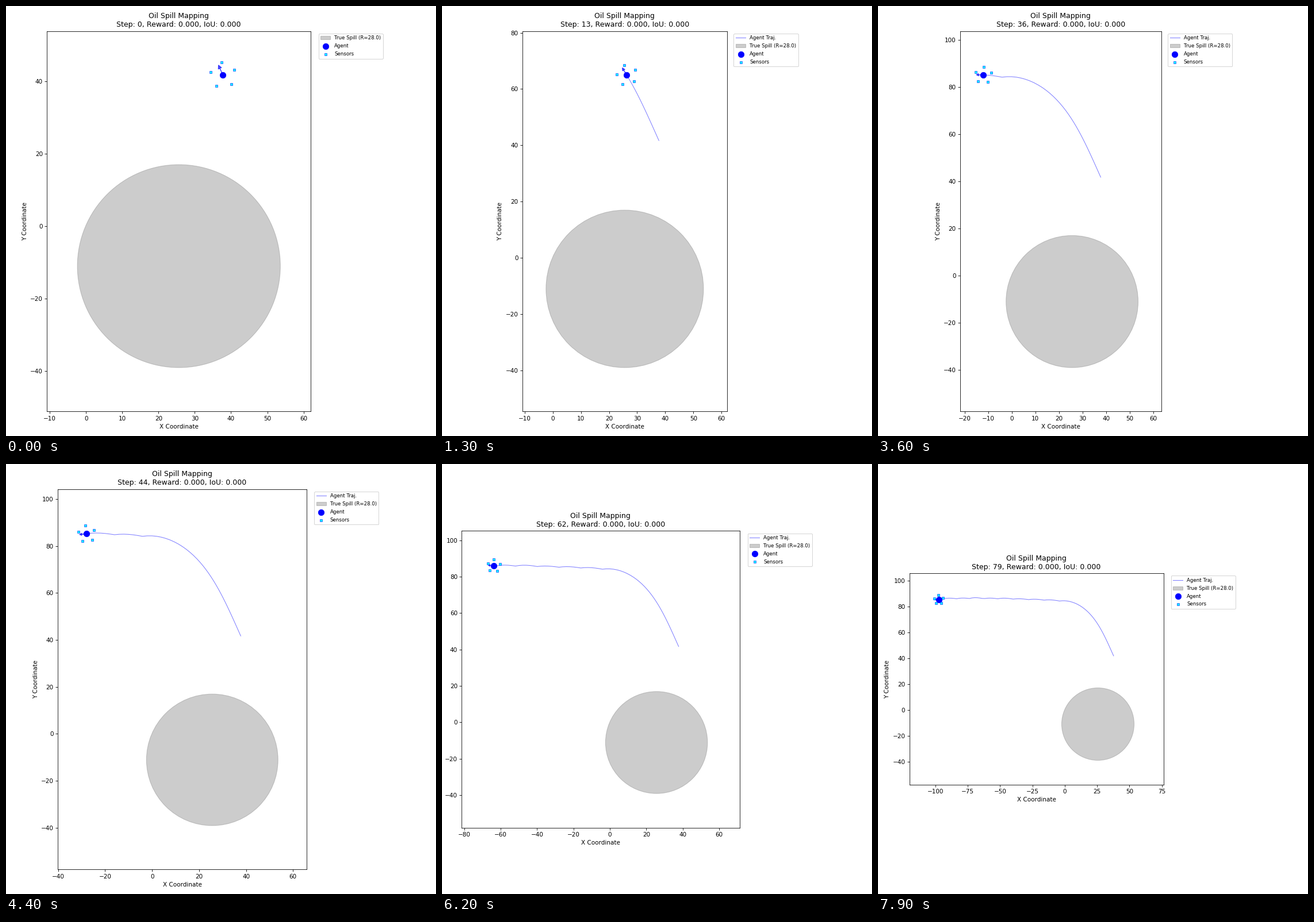
Animation of 748x748 px, one loop 8 s. Source, as a matplotlib script:

```python
import matplotlib.pyplot as plt
import numpy as np
from matplotlib.animation import FuncAnimation

STEPS = 80
SPEED = 2.0
START = (37.74, 41.66)
CENTER = np.array([25.6, -11.07])
RADIUS = 28.0
SENSOR_RANGE = 3.5
MARGIN = 0.15

# Steering cycles: (last step, heading after the correction, heading before the next)
CYCLES = [(38, 170, 185.5), (44, 171.5, 186.5), (50, 172.5, 185.5),
          (56, 171, 189), (61, 172.5, 187), (62, 178, 178),
          (67, 170.5, 193), (72, 174, 190), (78, 173, 195), (79, 182, 182)]


def build_headings():
    """Heading in degrees per step: a tightening turn, then a sawtooth drift."""
    turn = 114 + 41.8 * (np.arange(33) / 26) ** 2.6
    parts, last = [turn], 32
    for end, low, high in CYCLES:
        u = np.linspace(0, 1, end - last)
        parts.append(low + (high - low) * u ** 1.4)
        last = end
    return np.radians(np.concatenate(parts))


heading = build_headings()
moves = SPEED * np.column_stack([np.cos(heading), np.sin(heading)])
moves[0] = START
path = np.cumsum(moves, axis=0)

fig = plt.figure(figsize=(10, 10), dpi=74.8)
ax = fig.add_subplot()


def set_limits(trail):
    low = np.minimum(trail.min(axis=0), CENTER - RADIUS)
    high = np.maximum(trail.max(axis=0), CENTER + RADIUS)
    pad = MARGIN * (high - low)
    ax.set_xlim(low[0] - pad[0], high[0] + pad[0])
    ax.set_ylim(low[1] - pad[1], high[1] + pad[1])
    ax.set_aspect("equal", adjustable="box")


def draw_agent(pos, angle):
    ax.scatter(*pos, s=100, c="blue", linewidths=0.75, zorder=5, label="Agent")
    ax.arrow(*pos, 2 * np.cos(angle), 2 * np.sin(angle), head_width=1,
             head_length=1, fc="blue", ec="blue", alpha=0.7, zorder=4)
    spread = angle - np.pi / 2 + np.arange(5) * 2 * np.pi / 5
    ax.scatter(pos[0] + SENSOR_RANGE * np.cos(spread),
               pos[1] + SENSOR_RANGE * np.sin(spread),
               s=20, c="cyan", marker="s", edgecolors="blue",
               linewidths=0.5, zorder=6, label="Sensors")


def update(step):
    ax.clear()
    fig.subplots_adjust(left=0.125, right=0.9, bottom=0.11, top=0.88)
    trail = path[:step + 1]
    if step:
        ax.plot(*trail.T, "b-", lw=1, alpha=0.5, label="Agent Traj.")
    ax.add_patch(plt.Circle(CENTER, RADIUS, color="gray", alpha=0.4,
                            label=f"True Spill (R={RADIUS:.1f})"))
    draw_agent(path[step], heading[step])
    set_limits(trail)
    ax.set_xlabel("X Coordinate")
    ax.set_ylabel("Y Coordinate")
    ax.set_title(f"Oil Spill Mapping\nStep: {step}, Reward: 0.000, IoU: 0.000",
                 pad=7.2)
    ax.legend(loc="upper left", bbox_to_anchor=(1.02, 1), fontsize="small",
              labelspacing=0.56)
    fig.tight_layout(rect=(0, 0, 0.85, 1))
    return []


anim = FuncAnimation(fig, update, frames=STEPS, interval=100, repeat=True)
plt.show()
```
